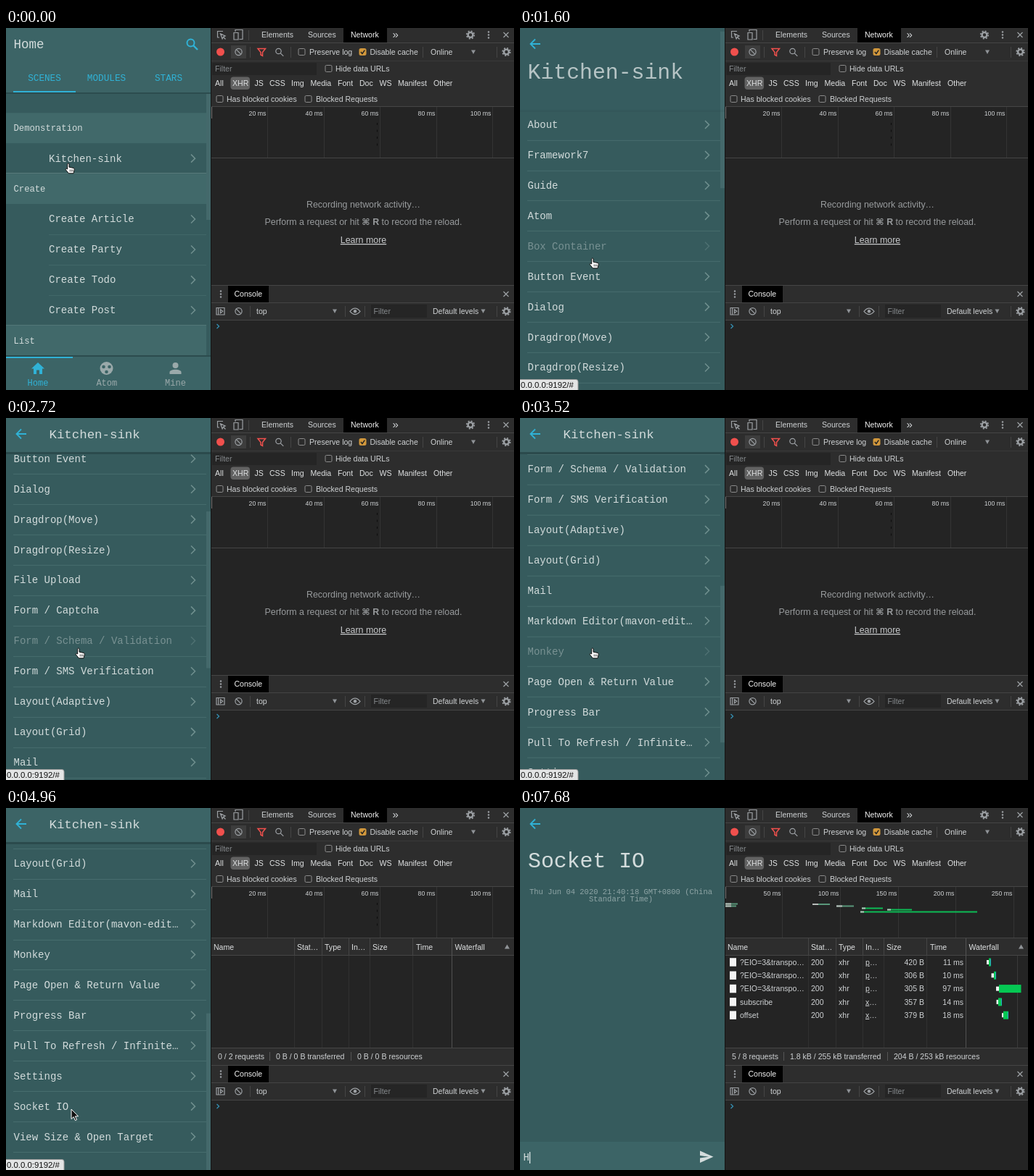
An HTML page that plays this animation: 700 by 500 pixels, repeating every 8 s.

```html
<!DOCTYPE html>
<html lang="en">
<head>
<meta charset="utf-8">
<title>App and network panel</title>
<style>
html, body { margin: 0; width: 100%; height: 100%; overflow: hidden; background: #242424; }
svg { display: block; }
text { white-space: pre; }
.mono { font-family: "Liberation Mono", "Courier New", monospace; fill: #d3dcdc; }
.sans { font: 10.55px "Liberation Sans", Arial, sans-serif; fill: #cfd2d4; }
.line { fill: none; stroke-width: 1; stroke: #4b4b4b; }
.icon { fill: none; stroke: #9da1a5; stroke-width: 1.2; }
</style>
</head>
<body>
<svg id="stage" width="700" height="500" viewBox="0 0 700 500"></svg>
<script>
const LOOP = 8000, ROW = 41.93, TOP = 123.7, BLUE = '#30b2d6';
const BASE = '#365b5d', BAR = '#3c6466', TITLE = '#41696a', TOOL = '#2d2d2d';

const text = (x, y, s, attrs = '') => `<text x="${x}" y="${y}" ${attrs}>${s}</text>`;
const rect = (x, y, w, h, fill, attrs = '') =>
  `<rect x="${x}" y="${y}" width="${w}" height="${h}" fill="${fill}" ${attrs}/>`;
const path = (d, attrs = '') => `<path d="${d}" ${attrs}/>`;
const vline = (x, y1, y2, color = '#454545') => path(`M${x + .5} ${y1}V${y2}`, `class="line" style="stroke:${color}"`);
const hline = (y, x1 = 283, x2 = 700, color = '#454545') => path(`M${x1} ${y + .5}H${x2}`, `class="line" style="stroke:${color}"`);
const circle = (x, y, r, attrs = '') => `<circle cx="${x}" cy="${y}" r="${r}" ${attrs}/>`;
const size = n => `font-size="${n}"`;

// ---- app pages ----
const chevron = y => path(`M255 ${y - 5.5}l5.5 5.5-5.5 5.5`, 'fill="none" stroke="#70908f" stroke-width="1.5"');
const rule = (y, color = '#476d6e') => hline(y, 10, 276, color);
const back = path('M28 22H15M21 15.5L14.5 22L21 28.5', `fill="none" stroke="${BLUE}" stroke-width="1.8"`);

function homePage() {
  const rows = ['#Demonstration', 'Kitchen-sink', '#Create', 'Create Article', 'Create Party', 'Create Todo', 'Create Post', '#List'];
  const list = rows.map((name, i) => {
    const y = 138.2 + i * ROW, top = y - ROW / 2;
    if (name[0] === '#') return rect(0, top, 276, ROW, TITLE) + text(10.5, y + 4, name.slice(1), size(12.2));
    return text(59, y + 4.5, name, size(14)) + chevron(y) +
      (rows[i + 1][0] === '#' ? hline(Math.round(top + ROW) - 1, 0, 276, '#587b7b') : hline(Math.round(top + ROW), 59, 276, '#416768'));
  }).join('');
  const tab = (x, s) => text(x, 73, s, `${size(12.7)} fill="${BLUE}" text-anchor="middle"`);
  const nav = (x, s, color) => text(x, 494, s, `${size(12)} fill="${color}" text-anchor="middle"`);
  return rect(0, 0, 282, 500, BASE) + rect(276, 90, 6, 175, '#44696b') +
    rect(0, 159.2, 276, ROW, '#ffffff', 'id="press" opacity="0"') + list +
    rect(0, 0, 282, 89, BAR) + rect(0, 89, 282, 2, '#2c4c4e') +
    text(10.5, 28, 'Home', size(17.5)) +
    circle(254.5, 20.5, 5, `fill="none" stroke="${BLUE}" stroke-width="2"`) +
    path('M258 24l6 6', `stroke="${BLUE}" stroke-width="2.4"`) +
    tab(53, 'SCENES') + tab(138.5, 'MODULES') + tab(224, 'STARS') +
    rect(10, 87, 86, 2, BLUE) +
    rect(0, 453, 282, 47, BAR) + rect(0, 452, 282, 2, '#2c4c4e') + rect(0, 454, 92, 2, BLUE) +
    path('M44 462L35 470.5H38V478H42V472.5H46V478H50V470.5H53Z', `fill="${BLUE}"`) +
    circle(138.5, 470, 9, 'fill="#9aa9aa"') +
    [[134.5, 468], [142.5, 468], [138.5, 475]].map(p => circle(...p, 2.3, `fill="${BAR}"`)).join('') +
    circle(233.5, 466, 4, 'fill="#9aa9aa"') + path('M225.5 478v-2.5c0-5 16-5 16 0v2.5z', 'fill="#9aa9aa"') +
    nav(44, 'Home', BLUE) + nav(138.8, 'Atom', '#9aa9aa') + nav(233.5, 'Mine', '#9aa9aa');
}

const items = ['About', 'Framework7', 'Guide', 'Atom', 'Box Container', 'Button Event', 'Dialog', 'Dragdrop(Move)',
  'Dragdrop(Resize)', 'File Upload', 'Form / Captcha', 'Form / Schema / Validation', 'Form / SMS Verification',
  'Layout(Adaptive)', 'Layout(Grid)', 'Mail', 'Markdown Editor(mavon-edit…', 'Monkey', 'Page Open &amp; Return Value',
  'Progress Bar', 'Pull To Refresh / Infinite…', 'Settings', 'Socket IO', 'View Size &amp; Open Target'];

function sinkPage() {
  const list = items.map((name, i) => {
    const y = TOP + (i + .5) * ROW;
    return `<g class="item">${text(10.5, y + 4.5, name, size(14))}${chevron(y)}</g>` + rule(Math.round(y + ROW / 2));
  }).join('');
  return rect(0, 0, 282, 560, BASE) + `<g id="list">${list}</g>` +
    rect(276, 0, 6, 216.5, '#44696b', 'id="thumb"') +
    rect(0, 47, 282, 3, '#2b4a4c', 'id="shade"') + rect(0, 0, 282, 124, BAR, 'id="head"') +
    text(10.5, 81.5, 'Kitchen-sink', `${size(29.8)} id="big"`) +
    text(59.5, 28, 'Kitchen-sink', `${size(17.4)} id="small"`) + back;
}

function chatPage() {
  const date = 'font-size="10.5" fill="#8fa5a6" text-anchor="middle"';
  return rect(0, 0, 282, 560, BASE) + back + text(11, 81.5, 'Socket IO', size(29.8)) +
    `<g id="date">${text(139, 119, 'Thu Jun 04 2020 21:40:18 GMT+0800 (China', date)}${text(139, 129, 'Standard Time)', date)}</g>` +
    rect(0, 461, 282, 100, BAR) + text(4.5, 487, 'Message', `${size(14)} fill="#567170" id="hint"`) +
    text(4.5, 487, 'H', `${size(14)} id="typed"`) + rect(4.5, 475, 1.2, 16, '#e6eeee', 'id="caret"') +
    path('M248 473.5L266.5 481.7L248 490V483.5L260 481.7L248 480Z', 'fill="#d3dcdc"');
}

// ---- network panel ----
const cross = y => path(`M685.5 ${y - 3.5}l7 7m0-7l-7 7`, 'class="icon"');
const dots = (x, y) => [-4, 0, 4].map(d => circle(x, y + d, 1.2, 'fill="#9da1a5"')).join('');
const gear = (x, y) => circle(x, y, 3.4, 'class="icon" style="stroke-width:2.4"') +
  circle(x, y, 5.3, 'class="icon" style="stroke-width:1.6" stroke-dasharray="2.08 2.08"');
const ban = (x, y) => circle(x, y, 4.6, 'class="icon"') + path(`M${x - 3.3} ${y - 3.3}l6.6 6.6`, 'class="icon"');
const down = (x, y) => path(`M${x - 3} ${y - 2.5}h6l-3 5.5z`, 'fill="#8f9397"');
const box = (x, y, on) => rect(x - 4.5, y - 4.5, 9, 9, on ? '#d2983c' : '#2b2b2b', `rx="1.5" stroke="${on ? '#d2983c' : '#8c8c8c'}"`) +
  (on ? path(`M${x - 2.6} ${y}l2 2.4 3.4-4.8`, 'fill="none" stroke="#222" stroke-width="1.5"') : '');

function panel() {
  const types = [['All', 288], ['XHR', 312], ['JS', 342.5], ['CSS', 363], ['Img', 393], ['Media', 419.5], ['Font', 457],
    ['Doc', 487], ['WS', 514.5], ['Manifest', 540], ['Other', 589]];
  return rect(282, 0, 418, 500, '#242424') + rect(282, 0, 1, 500, '#151515') +
    rect(283, 0, 417, 109, TOOL) + hline(20) + hline(45, 283, 700, '#3a3a3a') +
    path('M299 4.5H291.5V13H294M295.5 8l2.6 7 1.3-2.7 2.7-1.3zM299 12l3.5 3.5', 'class="icon"') +
    path('M316 5V2.5H326V15.5H321.5M314 6.5h6v9.5h-6z', 'class="icon"') + vline(334, 3, 17) +
    rect(465, 0, 60, 20, '#000') +
    text(352, 13, 'Elements') + text(416, 13, 'Sources') + text(475, 13, 'Network', 'fill="#f3f3f3"') +
    text(532.5, 14, '»', 'font-size="15"') + gear(640, 9.5) + dots(665, 9.5) + cross(9.5) +
    circle(295.5, 33, 5.5, 'fill="#f0504d"') + rect(310, 24, 21, 18, '#3d3d3d') + ban(320.5, 33) + vline(336, 26, 41) +
    path('M347 28.5h10.5l-4 5v5l-2.5-1.5v-3.5z', 'fill="none" stroke="#f0504d" stroke-width="1.5"') +
    circle(375.5, 32, 3.7, 'class="icon"') + path('M378.3 34.8l4 4', 'class="icon"') + vline(392, 26, 41) +
    box(407.5, 33) + text(418, 36.7, 'Preserve log') + box(491.5, 33, true) + text(501.5, 36.7, 'Disable cache') +
    vline(574, 26, 41) + text(585, 36.7, 'Online') + down(644, 33) + vline(676, 26, 41) + gear(689.5, 33) +
    rect(284, 48, 144, 17, '#252525') + text(288, 60, 'Filter', 'fill="#85898c"') +
    box(444.5, 56) + text(454, 59.7, 'Hide data URLs') +
    rect(309.5, 67.5, 26.5, 17.5, '#626262', 'rx="4"') + types.map(([s, x]) => text(x, 80.2, s, 'fill="#dfe1e2"')).join('') +
    box(294.5, 98) + text(304, 101.5, 'Has blocked cookies') + box(416.5, 98) + text(427, 101.5, 'Blocked Requests') +
    hline(108) + hline(179) +
    rect(283, 355, 417, 24, TOOL) + hline(355) + dots(296, 367.5) + rect(306, 356, 56, 23, '#000') +
    text(314.5, 371, 'Console', 'fill="#f3f3f3"') + cross(367.5) +
    rect(283, 379, 417, 24, TOOL) + hline(379) + hline(403) +
    path('M290 386.5h11v9.5h-11zM292.7 386.5v9.5M295.5 388.8l3.2 2.5-3.2 2.5z', 'class="icon"') + ban(320.5, 391.3) +
    vline(336, 384, 399) + text(345, 395, 'top') + down(453, 391) + vline(467, 384, 399) +
    path('M474 391.3q7-8.5 14 0q-7 8.5-14 0z', 'class="icon"') + circle(481, 391.3, 2.2, 'fill="#9da1a5"') + vline(494, 384, 399) +
    rect(503, 382, 77, 18, '#252525') + text(506.5, 395, 'Filter', 'fill="#85898c"') +
    text(588, 395, 'Default levels') + down(657.5, 391) + vline(676, 384, 399) + gear(689.5, 391.3) +
    path('M290.5 409l3 3-3 3', 'fill="none" stroke="#3590b4" stroke-width="1.3"');
}

function ruler(first, gap, step) {
  return [1, 2, 3, 4, 5].map(n => {
    const x = Math.round(first + (n - 1) * gap);
    return vline(x, 109, 179, '#343434') + text(x - 1.5, 120.5, n * step + ' ms', 'font-size="8.8" text-anchor="end"');
  }).join('') + vline(283, 109, 125, '#777');
}

function emptyState() {
  const mid = 'font-size="12.4" text-anchor="middle" fill="#989b9d"';
  return text(492.5, 248, 'Recording network activity…', mid) +
    text(492.5, 272, 'Perform a request or hit <tspan font-weight="bold" font-family="Liberation Sans, DejaVu Sans, sans-serif">⌘ R</tspan> to record the reload.', mid) +
    text(492.5, 297, 'Learn more', mid.replace('#989b9d', '#c9cbcd') + ' text-decoration="underline"');
}

function table() {
  const heads = [['Name', 286], ['Stat…', 401], ['Type', 439], ['In…', 476], ['Size', 505], ['Time', 565], ['Waterfall', 618.5]];
  return rect(283, 180, 417, 24, TOOL) + hline(203) +
    [397, 435, 472, 501, 560].map(x => vline(x, 180, 204) + vline(x, 204, 331, '#313131')).join('') + vline(614, 180, 331, '#525252') +
    heads.map(([s, x]) => text(x, 195.5, s, 'fill="#dfe1e2"')).join('') + path('M687 194.5h7l-3.5-6z', 'fill="#8f9397"') +
    rect(283, 331, 417, 24, TOOL) + hline(331);
}

function footer(parts) {
  return parts.map(([s, x], i) => text(x, 346.7, s) + (i ? vline(x - 9, 337, 349, '#555') : '')).join('');
}

function results() {
  const poll = '?EIO=3&amp;transpo…', end = 'text-anchor="end"';
  const rows = [[poll, 'p', 420, 11, 643, 646, 649], [poll, 'p', 306, 10, 649.5, 653, 656], [poll, 'p', 305, 97, 656, 660, 690.5],
    ['subscribe', 'x', 357, 14, 656.5, 659, 664], ['offset', 'x', 379, 18, 664, 666, 673]];
  const spans = [[283, 300, 132.5], [283, 298, 135.5], [403, 427, 133], [436, 460, 135.5], [471, 500, 138.5], [506, 540, 140.5], [469, 630, 143.5]];
  return vline(685, 204, 331, '#3a3a3a') + rows.map(([name, init, bytes, ms, a, b, c], i) => {
    const y = 213 + i * 18.3, base = y + 3.7;
    return rect(289, y - 5.8, 9, 11.5, '#f4f4f4') + text(303, base, name) + text(401, base, 200) + text(439, base, 'xhr') +
      text(476, base, `<tspan text-decoration="underline">${init}</tspan>…`) + text(557, base, bytes + ' B', end) + text(611, base, ms + ' ms', end) +
      rect(a, y - 3, b - a, 6, '#f1f1f1') + rect(b, y - 5.5, c - b, 11, '#05c853') +
      (i === 2 ? '' : rect(c - 1, y - 4.5, 1, 9, '#2aa8c9'));
  }).join('') + spans.map(([a, b, y], i) =>
    rect(a, y - 1, b - a, 2, i < 4 ? '#59977a' : '#0cbb55') + rect(a, y - 1, i < 4 ? 8 : 5, 2, '#b9bdbb')).join('') +
    footer([['5 / 8 requests', 292], ['1.8 kB / 255 kB transferred', 372], ['204 B / 253 kB resources', 515]]);
}

// ---- pointers, tip at 0,0 ----
const pointers = {
  arrow: path('M0 0V13.5L3.2 10.6L5.4 15.6L7.6 14.6L5.4 9.8H9.6Z', 'fill="#111" stroke="#fff" stroke-width="1"'),
  hand: path('M-1.3 1C-1.3-.4 1-.4 1 1V5.2L7 6.4Q8.6 6.8 8.2 9L7 13.8H.4L-3.6 8.8C-4.4 7.4-2.8 6.6-1.3 8Z', 'fill="#fff" stroke="#111" stroke-width="1"') +
    path('M2.2 8.5V11.5M4.2 8.5V11.5M6 8.5V11.5', 'stroke="#111" stroke-width=".7"'),
  beam: path('M-2.5-7Q0-7 0-5Q0-7 2.5-7M0-5V5M-2.5 7Q0 7 0 5Q0 7 2.5 7', 'fill="none" stroke="#e8e8e8" stroke-width="1"')
};

document.getElementById('stage').innerHTML =
  `<svg width="282" height="500" class="mono"><g id="home">${homePage()}</g><g id="sink">${sinkPage()}</g><g id="chat">${chatPage()}</g></svg>` +
  `<g class="sans">${panel()}
    <g id="scaleA">${ruler(360, 77.5, 20)}${path('M511.5 131V167', 'stroke="#0c0c0c" stroke-dasharray="3 6.5"')}</g>
    <g id="scaleB">${ruler(361, 79.8, 50)}</g>
    <g id="empty">${emptyState()}</g><g id="table">${table()}</g>
    <g id="waiting">${footer([['0 / 2 requests', 292], ['0 B / 0 B transferred', 372], ['0 B / 0 B resources', 484]])}</g>
    <g id="results">${results()}</g>
    <g id="status">${rect(-4, 485.5, 84, 20, '#e3e5e5', 'rx="3" stroke="#9b9b9b"')}${text(1, 497, '0.0.0.0:9192/#', 'font-size="11.4" fill="#111"')}</g>
  </g><g id="pointer">${Object.entries(pointers).map(([k, v]) => `<g id="${k}">${v}</g>`).join('')}</g>`;

// ---- motion ----
const el = id => document.getElementById(id);
const rows = [...document.querySelectorAll('.item')];
const clamp = v => Math.max(0, Math.min(1, v));
const show = (id, on) => el(id).setAttribute('visibility', on ? 'visible' : 'hidden');
const fade = (id, v) => el(id).setAttribute('opacity', clamp(v));
const move = (id, x, y) => el(id).setAttribute('transform', `translate(${x} ${y})`);

function track(t, points) {
  const i = points.findIndex(p => p[0] > t);
  if (i === 0) return points[0][1];
  if (i < 0) return points[points.length - 1][1];
  const [a, u] = points[i - 1], [b, v] = points[i];
  return u + (v - u) * (t - a) / (b - a);
}

const scrollPath = [[1500, 0], [1700, 22], [2080, 108], [3520, 535], [3900, 630], [4250, 655]];
const pathX = [[160, 86], [480, 88], [640, 98], [960, 100], [4300, 100], [4800, 90], [5000, 90], [6080, 118], [6560, 52]];
const pathY = [[160, 187], [480, 184], [640, 178], [960, 318], [4300, 318], [4800, 416], [5000, 416], [6080, 442], [6560, 482]];

function openPage(id, t, start) {
  const p = 1 - (1 - clamp((t - start) / 250)) ** 5;
  show(id, p > 0);
  fade(id, p);
  move(id, 0, 42 * (1 - p));
}

function draw(t) {
  const s = track(t, scrollPath), x = track(t, pathX), y = track(t, pathY);
  const kind = t < 560 ? 'hand' : t < 960 ? 'arrow' : t < 4880 ? 'hand' : t < 6400 ? 'arrow' : t < 7520 ? 'beam' : '';

  fade('press', t >= 160 ? .07 : 0);
  openPage('sink', t, 560);
  openPage('chat', t, 5200);

  move('list', 0, -s);
  move('big', 0, -s);
  move('thumb', 0, s * 500 / 1155);
  const h = Math.max(47, 124 - s);
  el('head').setAttribute('height', h);
  el('shade').setAttribute('y', h);
  fade('head', s / 77);
  fade('shade', s / 77);
  fade('big', 1 - s / 60);
  fade('small', (s - 40) / 37);
  const hover = kind === 'hand' && t >= 960 ? Math.floor((y + s - TOP) / ROW) : -1;
  rows.forEach((row, i) => row.setAttribute('opacity', i === hover ? .42 : 1));

  const loaded = t >= 5280;
  show('empty', t < 4960);
  show('table', t >= 4960);
  show('waiting', t >= 4960 && !loaded);
  show('results', loaded);
  show('scaleA', !loaded);
  show('scaleB', loaded);
  show('status', t >= 320 && t < 5280);

  const typed = t >= 7520;
  fade('date', t >= 5440 ? 1 : 0);
  fade('hint', typed ? 0 : 1);
  fade('typed', typed ? 1 : 0);
  fade('caret', typed || t >= 6640 && t < 7200 ? 1 : 0);
  move('caret', typed ? 8.5 : 0, 0);

  move('pointer', x, y);
  for (const k in pointers) show(k, k === kind);
}

const start = performance.now();
function tick() {
  draw((performance.now() - start) % LOOP);
  requestAnimationFrame(tick);
}
draw(0);
requestAnimationFrame(tick);
</script>
</body>
</html>
```
